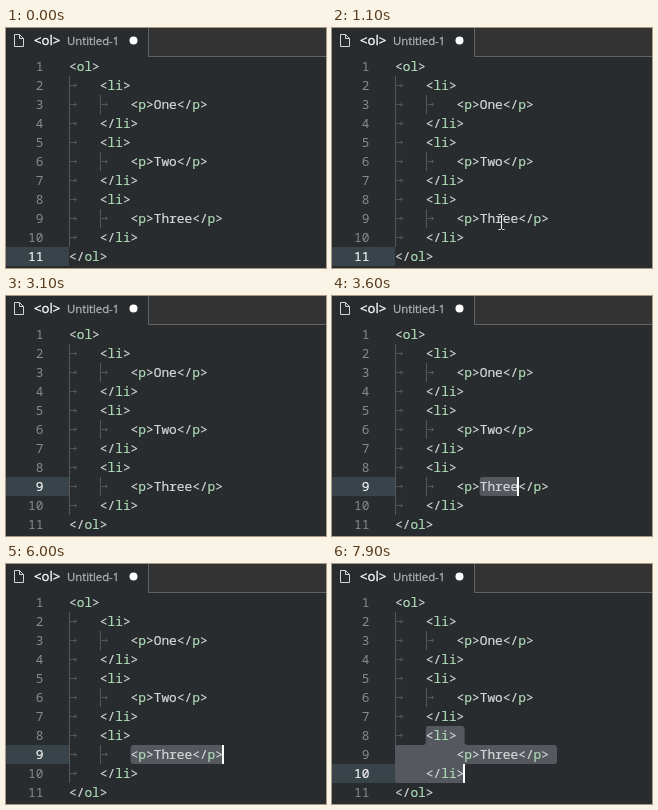
Animation of 320x240 px, one loop 8000 ms. Source, as an HTML page:

```html
<!DOCTYPE html>
<html lang="en">
<head>
<meta charset="utf-8">
<title>Expanding a selection</title>
<style>
  html, body { margin: 0; width: 100%; height: 100%; overflow: hidden; background: #282c2f; }
  svg { display: block; width: 320px; height: 240px; }
  text { white-space: pre; stroke-width: .2; }
  .code { font: 12.833px "Noto Sans Mono", "DejaVu Sans Mono", monospace; fill: #d6d8d8; stroke: #d6d8d8; }
  .tag { fill: #aedab6; stroke: #aedab6; }
  .num { fill: #868b8f; stroke: none; text-anchor: end; }
  .num.on { fill: #f4f4f2; stroke: #f4f4f2; }
  .tab { font-family: "Open Sans", "Noto Sans", sans-serif; stroke-width: .3; }
  .ws { fill: none; stroke: #54585a; }
</style>
</head>
<body>
<svg id="stage" viewBox="0 0 320 240">
  <rect width="320" height="240" fill="#282c2f"/>
  <rect x="142" width="178" height="28" fill="#333333"/>
  <path d="M142.5 0V28.5H320" fill="none" stroke="#626364"/>
  <path d="M8.5 6.5h5l4 4v8h-9zM13.5 6.5v4h4" fill="none" stroke="#d2d4d5"/>
  <text class="tab" x="28" y="17" font-size="13.2" fill="#fff" stroke="#fff">&lt;ol&gt;</text>
  <text class="tab" x="61" y="17" font-size="11.3" fill="#acafb0" stroke="#acafb0">Untitled-1</text>
  <circle cx="127.5" cy="12.5" r="4" fill="#fff"/>
  <rect id="active" width="63" height="19" fill="#39434a"/>
  <path id="sel" fill="#55595f"/>
  <g id="doc"></g>
  <rect id="caret" width="2" height="19" fill="#fff"/>
  <path id="beam" d="M-3 -8H-1L0 -7L1 -8H3M0 -7V6M-3 7H-1L0 6L1 7H3" fill="none" stroke="#f2f2f2"/>
  <path id="arrow" d="M.5 .5V16.5L4.2 13L6.6 18.5L9 17.5L6.6 12H11.7Z" fill="#fff" stroke="#000"/>
</svg>
<script>
const LOOP = 8000, LEFT = 63, CHAR = 7.7, ROW = 19, EOL = 8;
const $ = id => document.getElementById(id);
const colX = col => LEFT + col * CHAR;
const rowY = row => 29 + (row - 1) * ROW;

function add(parent, name, attrs, text) {
  const el = document.createElementNS("http://www.w3.org/2000/svg", name);
  for (const key in attrs) el.setAttribute(key, attrs[key]);
  if (text) el.textContent = text;
  parent.appendChild(el);
  return el;
}

const item = word => ["\t<li>", `\t\t<p>${word}</p>`, "\t</li>"];
const lines = ["<ol>", ...item("One"), ...item("Two"), ...item("Three"), "</ol>"];

const numbers = lines.map((line, i) => {
  const top = rowY(i + 1), mid = top + 9.5;
  const tabs = line.lastIndexOf("\t") + 1;
  for (let t = 0; t < tabs; t++) {
    const x = Math.round(colX(t * 4)) + .5;
    add($("doc"), "path", { class: "ws", d: `M${x} ${top}v${ROW}M${x + 1} ${mid}h6m-2 -2l2 2l-2 2` });
  }
  const row = add($("doc"), "text", { class: "code", x: colX(tabs * 4), y: top + 14 });
  for (const part of line.trim().split(/(\b(?:ol|li|p)\b)/)) {
    const isTag = /^(ol|li|p)$/.test(part);
    if (part) add(row, "tspan", isTag ? { class: "tag" } : {}, part);
  }
  return add($("doc"), "text", { class: "code num", x: 37.5, y: top + 14 }, String(i + 1));
});

// Closed path through the points with every corner rounded
function rounded(points, radius = 3) {
  const toward = (a, b) => {
    const dx = b[0] - a[0], dy = b[1] - a[1], len = Math.hypot(dx, dy);
    const k = Math.min(radius, len / 2) / len;
    return [a[0] + dx * k, a[1] + dy * k];
  };
  const n = points.length;
  return points.map((p, i) => {
    const before = toward(p, points[(i + n - 1) % n]);
    const after = toward(p, points[(i + 1) % n]);
    return `${i ? "L" : "M"}${before}Q${p} ${after}`;
  }).join("") + "Z";
}

function inline(row, from, to) {
  const y = rowY(row), a = colX(from), b = colX(to);
  return rounded([[a, y], [b, y], [b, y + ROW], [a, y + ROW]]);
}

// Three-row selection from rows 8 to 10
function block(from, to) {
  const [y0, y1, y2, y3] = [8, 9, 10, 11].map(rowY);
  const a = colX(from), b = colX(8) + EOL, c = colX(20) + EOL, d = colX(to), l = LEFT;
  return rounded([[a, y0], [b, y0], [b, y1], [c, y1], [c, y2], [d, y2], [d, y3], [l, y3], [l, y1], [a, y1]]);
}

// time, active row, caret column, selection
const states = [
  [0, 11, null, ""],
  [1700, 9, 14, ""],
  [3600, 9, 16, inline(9, 11, 16)],
  [5100, 9, 20, inline(9, 8, 20)],
  [6500, 10, 4, block(8, 4)],
  [7900, 10, 9, block(4, 9)]
];

// time, caret visible
const blinks = [
  [0, 0], [1700, 1], [2200, 0], [2600, 1], [3100, 0], [3500, 1], [4200, 0], [4600, 1],
  [5000, 0], [5100, 1], [5600, 0], [6000, 1], [6900, 0], [7400, 1]
];

// time, pointer shape, position
const pointer = [
  [0, ""],
  [300, "arrow", 24, 0],
  [400, "beam", 75.5, 68.5],
  [500, "beam", 117.5, 130.5],
  [600, "beam", 142.5, 163.5],
  [700, "beam", 156.5, 180.5],
  [800, "beam", 164.5, 190.5],
  [900, "beam", 168.5, 195.5],
  [1000, "beam", 170.5, 196.5],
  [1100, "beam", 169.5, 194.5],
  [1300, "beam", 169.5, 191.5],
  [2000, "beam", 174.5, 205.5],
  [2100, "beam", 183.5, 233.5],
  [2200, ""]
];

const at = (table, t) => table.findLast(step => step[0] <= t);
const show = (id, on) => $(id).setAttribute("visibility", on ? "visible" : "hidden");

function draw(t) {
  const [, row, col, shape] = at(states, t);
  $("active").setAttribute("y", rowY(row));
  numbers.forEach((el, i) => el.classList.toggle("on", i + 1 === row));
  $("sel").setAttribute("d", shape);

  show("caret", at(blinks, t)[1]);
  $("caret").setAttribute("x", Math.floor(colX(col || 0) - .5));
  $("caret").setAttribute("y", rowY(row));

  const [, kind, x, y] = at(pointer, t);
  for (const id of ["beam", "arrow"]) {
    show(id, id === kind);
    if (id === kind) $(id).setAttribute("transform", `translate(${x} ${y})`);
  }
}

const start = performance.now();
function tick() {
  draw((performance.now() - start) % LOOP);
  requestAnimationFrame(tick);
}
tick();
</script>
</body>
</html>
```
